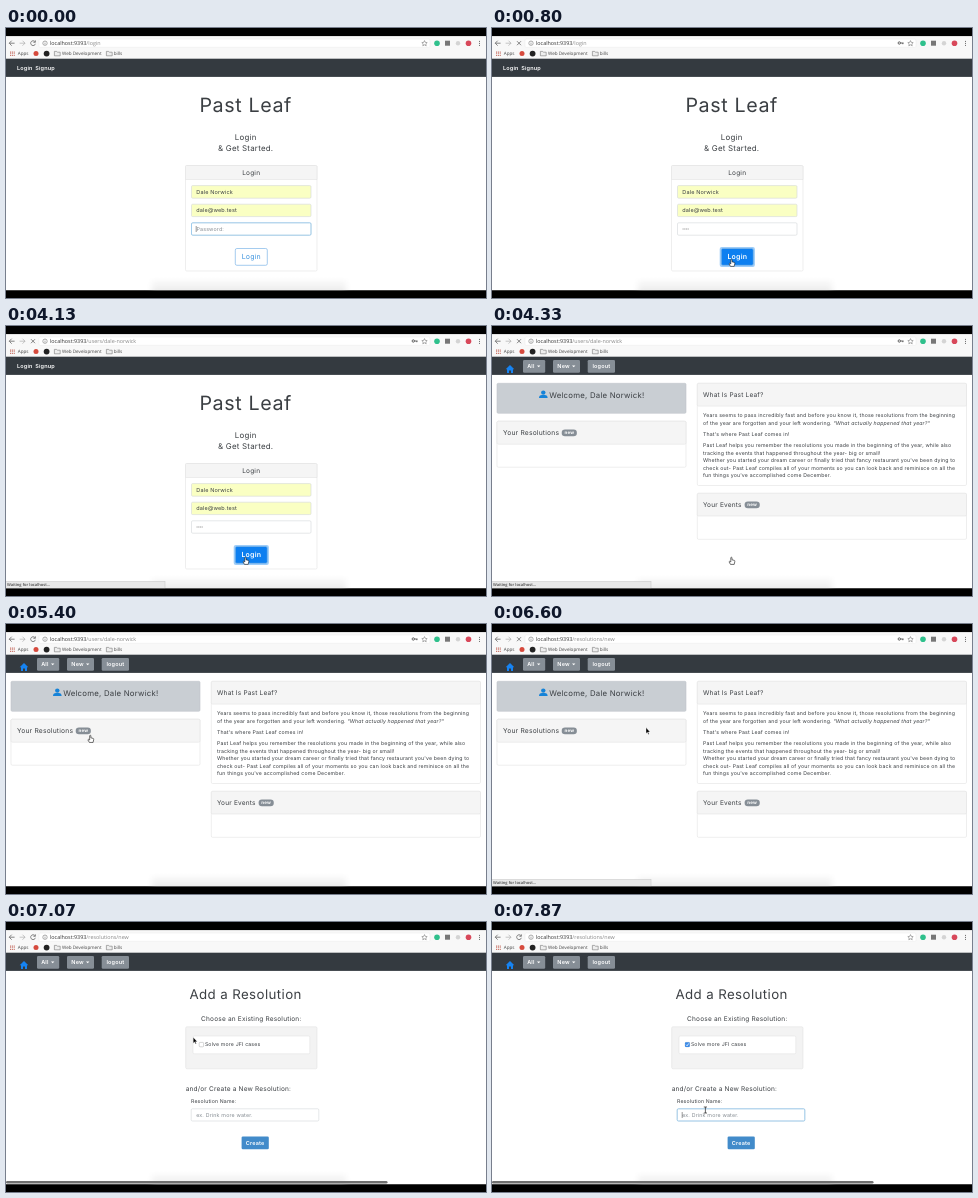
Animation, 480 px wide and 270 px high, one loop 8000 ms. Source, as an HTML page:

```html
<!DOCTYPE html>
<html lang="en">
<head>
<meta charset="utf-8">
<title>Login and resolutions</title>
<style>
html, body { margin: 0; width: 100%; height: 100%; overflow: hidden; background: #000; }
svg { display: block; width: 100vw; height: 100vh; }
text { font: 5.5px Inter, sans-serif; letter-spacing: .03em; fill: #3b3f43; text-rendering: geometricPrecision; }
.ui { font: 4.6px "Open Sans", sans-serif; letter-spacing: 0; fill: #444; }
.url { font-size: 5.4px; fill: #333; }
.url tspan { fill: #888; }
.mid { text-anchor: middle; }
.h1 { font-size: 19.7px; }
.h2 { font-size: 13.3px; }
.lead { font-size: 7.9px; }
.h4 { font-size: 6.5px; }
.body { font-size: 5.2px; }
.hint { font-size: 5.3px; fill: #858c92; }
.white { fill: #fff; font-weight: 600; }
.tag { font-size: 4.5px; font-weight: 700; fill: #fff; text-anchor: middle; }
.card { fill: #fff; stroke: #e2e2e2; stroke-width: .6; }
.head { fill: #f5f5f5; stroke: #e2e2e2; stroke-width: .6; }
.field { fill: #fff; stroke: #d3d7da; stroke-width: .6; }
.auto { fill: #faffc3; }
.grey { fill: #868e96; }
.focus { fill: none; stroke: #8fc6ec; stroke-width: .8; }
.icon { fill: none; stroke: #666; stroke-width: .8; }
</style>
</head>
<body>
<svg viewBox="0 0 480 270">
  <defs>
    <linearGradient id="dock" x2="0" y2="1"><stop stop-color="#fff"/><stop offset="1" stop-color="#ededed"/></linearGradient>
    <filter id="soft" x="-10%" width="120%"><feGaussianBlur stdDeviation="3 0"/></filter>
  </defs>
  <rect width="480" height="270"/>
  <rect y="8.3" width="480" height="254.2" fill="#fff"/>
  <rect x="146" y="249" width="194" height="13.5" fill="url(#dock)" filter="url(#soft)"/>

  <!-- browser -->
  <rect y="8.3" width="480" height="22.7" fill="#f8f8f8"/>
  <rect x="33" y="11" width="391" height="8.4" rx="1.2" fill="#fff" stroke="#e6e6e6" stroke-width=".4"/>
  <path class="icon" d="M8.6 15.2H3.4M5.7 12.7L3.2 15.2L5.7 17.7"/>
  <path class="icon" opacity=".45" d="M13.6 15.2H18.8M16.5 12.7L19 15.2L16.5 17.7"/>
  <path id="reload" class="icon" d="M28.9 13.6A2.4 2.4 0 1 0 29.4 15.8M29.4 12.4V14.3H27.4"/>
  <path id="stop" class="icon" d="M25 13.2L29 17.2M29 13.2L25 17.2"/>
  <g fill="none" stroke="#777" stroke-width=".6">
    <circle cx="39" cy="15.2" r="2.2"/><path d="M39 14.9V16.5M39 13.7V14.3"/>
    <path d="M418.5 12.6L419.3 14.4L421.2 14.6L419.8 15.9L420.2 17.8L418.5 16.8L416.8 17.8L417.2 15.9L415.8 14.6L417.7 14.4Z"/>
  </g>
  <g id="key" fill="none" stroke="#555" stroke-width=".9"><circle cx="407.3" cy="15" r="1.2"/><path d="M408.5 15H411.6M410.8 15V16.2"/></g>
  <text class="ui url" x="44" y="17.1">localhost:9393<tspan id="path"></tspan></text>
  <circle cx="431" cy="15.2" r="2.8" fill="#2fc08c"/>
  <rect x="439" y="12.7" width="5" height="5" fill="#777"/>
  <circle cx="452" cy="15.2" r="2.2" fill="#d4d4d4"/>
  <circle cx="462.5" cy="15.2" r="2.8" fill="#d8485a"/>
  <path d="M473.5 12.9V18" stroke="#666" stroke-width="1" stroke-dasharray="1 1"/>
  <path d="M4 24.1H9M4 25.8H9M4 27.5H9" stroke="#c9776c" stroke-width="1.1" stroke-dasharray="1.1 .75"/>
  <text class="ui" x="11.8" y="27.3">Apps</text>
  <circle cx="30" cy="25.6" r="2.5" fill="#d64a3d"/>
  <circle cx="40.6" cy="25.6" r="2.9" fill="#222"/>
  <g fill="#eee" stroke="#777" stroke-width=".6">
    <path d="M48.4 23.4H50.6L51.3 24.2H54.2V27.8H48.4Z"/><path d="M100.4 23.4H102.6L103.3 24.2H106.2V27.8H100.4Z"/>
  </g>
  <text class="ui" x="56" y="27.3">Web Development</text>
  <text class="ui" x="107.8" y="27.3">bills</text>
  <rect y="30.7" width="480" height="18.2" fill="#343a40"/>

  <g id="login">
    <text class="white" x="11" y="42.2">Login</text>
    <text class="white" x="29.2" y="42.2">Signup</text>
    <text class="h1 mid" x="239.7" y="83.7">Past Leaf</text>
    <text class="lead mid" x="239.7" y="112.3">Login</text>
    <text class="lead mid" x="239.7" y="123">&amp; Get Started.</text>
    <rect class="card" x="179.5" y="137.5" width="131.5" height="105.5" rx="1.3"/>
    <path class="head" d="M179.5 151.5V138.8Q179.5 137.5 180.8 137.5H309.7Q311 137.5 311 138.8V151.5Z"/>
    <text class="h4 mid" x="245.2" y="146.8">Login</text>
    <rect class="field auto" x="185.5" y="157.6" width="119.5" height="12.6" rx="1.2"/>
    <rect class="field auto" x="185.5" y="176.2" width="119.5" height="12.4" rx="1.2"/>
    <rect class="field" x="185.5" y="194.8" width="119.5" height="12.4" rx="1.2"/>
    <text x="190.3" y="165.8">Dale Norwick</text>
    <text x="190.3" y="184.3">dale@web.test</text>
    <rect id="passFocus" class="focus" x="185.5" y="194.8" width="119.5" height="12.4" rx="1.2"/>
    <path id="passCaret" d="M190.2 198V204" stroke="#333" stroke-width=".5"/>
    <text id="passHint" class="hint" x="190.5" y="202.9">Password:</text>
    <path id="dots" stroke="#888" stroke-width=".8" stroke-dasharray="1.2 .5"/>
    <rect id="glow" x="227.7" y="218.9" width="35.2" height="20" rx="2.2" fill="#9fcdf8"/>
    <rect id="btn" x="229.3" y="220.5" width="32" height="16.8" rx="1.6" stroke="#7fb7e8" stroke-width=".7"/>
    <text id="btnText" class="mid" x="245.3" y="231.3" style="font-size:7px">Login</text>
  </g>

  <g id="menu">
    <path d="M13.7 43.3L18 39L22.3 43.3H21V47H19V44.5H17V47H15V43.3Z" fill="#1683f2"/>
    <g class="grey">
      <rect x="31" y="34" width="22.2" height="12.8" rx="1.3"/>
      <rect x="61" y="34" width="27" height="12.8" rx="1.3"/>
      <rect x="95.7" y="34" width="27.3" height="12.8" rx="1.3"/>
    </g>
    <text class="white" x="35.2" y="42.4">All</text>
    <text class="white" x="65.3" y="42.4">New</text>
    <text class="white mid" x="109.4" y="42.4">logout</text>
    <path d="M45 39.6H48.4L46.7 41.3ZM80 39.6H83.4L81.7 41.3Z" fill="#fff"/>
  </g>

  <g id="home">
    <rect x="5" y="57.3" width="189" height="30" rx="1.3" fill="#c9ced3" stroke="#bfc4c9" stroke-width=".6"/>
    <g fill="#1683d8"><circle cx="51.3" cy="66.6" r="2.2"/><path d="M47 72Q47 69 50 69H52.6Q55.6 69 55.6 72Z"/></g>
    <text x="57.2" y="71.5" style="font-size:7.8px">Welcome, Dale Norwick!</text>
    <rect class="card" x="5" y="95.2" width="189" height="46" rx="1.3"/>
    <rect class="head" x="5" y="95.2" width="189" height="23" rx="1.3"/>
    <text class="h4" x="11" y="108.7" style="font-size:6.7px">Your Resolutions</text>
    <rect class="grey" x="69.7" y="103.6" width="15.2" height="6.6" rx="3.3"/>
    <text class="tag" x="77.3" y="108.4">new</text>
    <rect class="card" x="205.3" y="57.3" width="269.2" height="102.2" rx="1.3"/>
    <rect class="head" x="205.3" y="57.3" width="269.2" height="22.8" rx="1.3"/>
    <text class="h4" x="211" y="71">What Is Past Leaf?</text>
    <g id="about"></g>
    <rect class="card" x="205.3" y="167.3" width="269.2" height="46" rx="1.3"/>
    <rect class="head" x="205.3" y="167.3" width="269.2" height="22.7" rx="1.3"/>
    <text class="h4" x="211" y="180.7">Your Events</text>
    <rect class="grey" x="252.6" y="175.6" width="15.2" height="6.6" rx="3.3"/>
    <text class="tag" x="260.2" y="180.4">new</text>
  </g>

  <g id="form">
    <text class="h2 mid" x="239.6" y="77">Add a Resolution</text>
    <text class="h4 mid" x="245.3" y="99">Choose an Existing Resolution:</text>
    <rect class="head" x="179.7" y="104.8" width="131.3" height="42" rx="1.3" style="fill:#f3f3f3"/>
    <rect class="card" x="187" y="114" width="116.8" height="17.8" rx="1.2"/>
    <rect x="193.2" y="120.4" width="4.4" height="4.4" rx=".8" fill="#fff" stroke="#aaa" stroke-width=".5"/>
    <g id="check"><rect x="193" y="120.2" width="4.8" height="4.8" rx=".9" fill="#3b8be8"/><path d="M194.1 122.7L195.1 123.8L196.8 121.4" fill="none" stroke="#fff" stroke-width=".8"/></g>
    <text class="body" x="198.9" y="124.3">Solve more JFI cases</text>
    <text class="h4" x="179.7" y="169.2">and/or Create a New Resolution:</text>
    <text class="body" x="185" y="181">Resolution Name:</text>
    <rect class="field" x="185.2" y="186.8" width="127.6" height="12.2" rx="1.2"/>
    <rect id="nameFocus" class="focus" x="185.2" y="186.8" width="127.6" height="12.2" rx="1.2"/>
    <text class="hint" x="190.2" y="194.9">ex. Drink more water.</text>
    <path id="nameCaret" d="M190.2 190V196" stroke="#333" stroke-width=".5"/>
    <rect x="235.6" y="214.5" width="27.2" height="12.8" rx="1.3" fill="#428bca"/>
    <text class="white mid" x="249.2" y="222.8">Create</text>
    <rect y="258.9" width="381.5" height="2.7" rx="1.3" fill="#707070"/>
  </g>

  <g id="status">
    <rect x="-1" y="255.5" width="160" height="7" fill="#e8e8e8" stroke="#c4c4c4" stroke-width=".5"/>
    <text class="ui" x="1" y="260.4" style="font-size:4px;font-weight:600">Waiting for localhost...</text>
  </g>

  <g id="pointer">
    <path id="arrow" d="M0 0V6L1.4 4.8L2.3 6.9L3.2 6.5L2.3 4.5H4.1Z" fill="#000" stroke="#fff" stroke-width=".4"/>
    <path id="hand" d="M-.6 0Q0 -.7 .6 0V2.2L3 2.8Q3.6 3 3.4 4L2.8 6.8H-.9L-2.4 4.2Q-2.2 3.2 -.6 4.3Z" fill="#fff" stroke="#111" stroke-width=".6"/>
    <path id="beam" d="M-1.6 -3H1.6M0 -3V3M-1.6 3H1.6" stroke="#222" stroke-width=".7"/>
  </g>
  <rect y="262.5" width="480" height="7.5"/>
</svg>
<script>
const LOOP = 8000;
const $ = id => document.getElementById(id);
const show = (id, on) => { $(id).style.display = on ? "" : "none"; };
const within = (t, ...spans) => spans.some(([a, b]) => t >= a && t < b);

const about = [
  [91.3, "Years seems to pass incredibly fast and before you know it, those resolutions from the beginning"],
  [98.8, "of the year are forgotten and your left wondering. <tspan font-style='italic'>\"What actually happened that year?\"</tspan>"],
  [110, "That's where Past Leaf comes in!"],
  [121.3, "Past Leaf helps you remember the resolutions you made in the beginning of the year, while also"],
  [128.8, "tracking the events that happened throughout the year- big or small!"],
  [136.3, "Whether you started your dream career or finally tried that fancy restaurant you've been dying to"],
  [143.8, "check out- Past Leaf compiles all of your moments so you can look back and reminisce on all the"],
  [151.3, "fun things you've accomplished come December."]
];
$("about").innerHTML = about.map(([y, s]) => `<text class="body" x="211" y="${y}">${s}</text>`).join("");

// pointer path: time, x, y
const route = [
  [470, 254, 208], [730, 239.4, 231.6], [4930, 239.4, 231.6], [5470, 77, 106],
  [5670, 77, 106], [5870, 154, 103.5], [6870, 154, 103.5], [7070, 187.2, 115.2],
  [7200, 195, 122], [7400, 195, 122], [7670, 213.4, 188]
];

function place(t) {
  const i = route.findIndex(p => p[0] > t);
  if (i < 0) return route.at(-1).slice(1);
  if (i === 0) return route[0].slice(1);
  const [t0, x0, y0] = route[i - 1], [t1, x1, y1] = route[i];
  const k = (t - t0) / (t1 - t0), e = k * k * (3 - 2 * k);
  return [x0 + (x1 - x0) * e, y0 + (y1 - y0) * e];
}

function draw(t) {
  const page = t < 4330 ? "login" : t < 6670 ? "home" : "form";
  for (const id of ["login", "home", "form"]) show(id, id === page);
  show("menu", page !== "login");

  const loading = within(t, [800, 5000], [5670, 6730]);
  show("stop", loading);
  show("reload", !loading);
  show("key", within(t, [800, 6670]));
  show("status", within(t, [1070, 5000], [5800, 6870]));
  $("path").textContent = t < 4130 ? "/login" : t < 6600 ? "/users/dale-norwick" : "/resolutions/new";

  const typed = Math.max(0, Math.min(4, Math.ceil((t - 69) / 67)));
  show("passHint", !typed);
  show("passCaret", t < 70);
  show("passFocus", t < 800);
  $("dots").setAttribute("d", `M190.5 201h${typed * 1.7}`);
  const hover = t >= 670;
  show("glow", t >= 800);
  $("btn").setAttribute("fill", hover ? "#0d7ff0" : "#fff");
  $("btnText").style.fill = hover ? "#fff" : "#3d94df";
  $("btnText").style.fontWeight = hover ? 600 : 400;

  show("check", t >= 7330);
  show("nameFocus", t >= 7800);
  show("nameCaret", t >= 7800);

  const [x, y] = place(t);
  const hand = within(t, [670, 4930], [5400, 5700]);
  const beam = t >= 7640;
  show("pointer", t >= 470);
  show("hand", hand);
  show("beam", beam);
  show("arrow", !hand && !beam);
  $("pointer").setAttribute("transform", `translate(${x.toFixed(2)} ${y.toFixed(2)})`);
}

const start = performance.now();
function tick(now) {
  draw(Math.max(0, now - start) % LOOP);
  requestAnimationFrame(tick);
}
draw(0);
requestAnimationFrame(tick);
</script>
</body>
</html>
```
